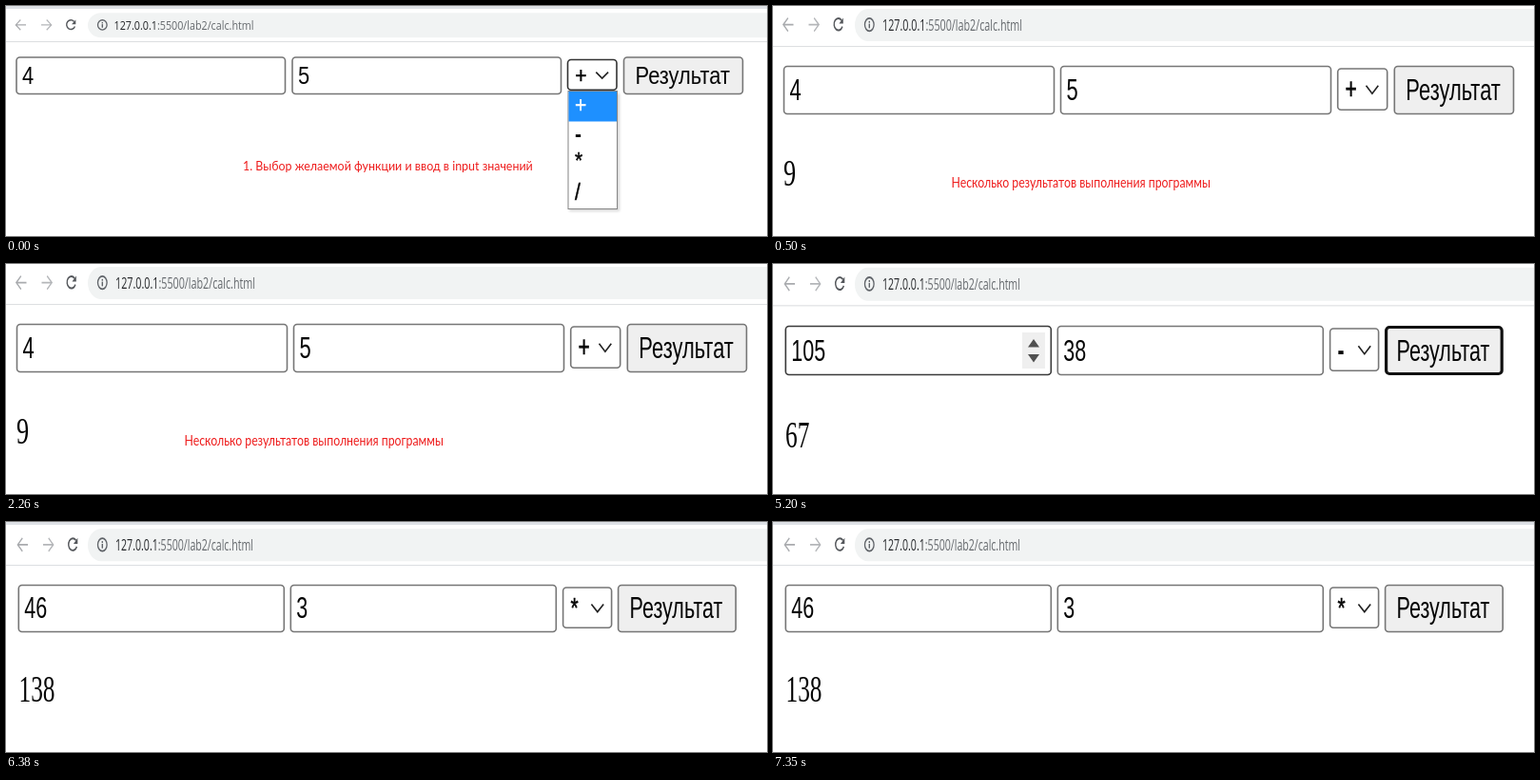
Animation of 800 by 242 pixels, one loop 8 s. Source, as an HTML page:

```html
<!DOCTYPE html>
<html lang="ru">
<head>
<meta charset="utf-8">
<title>Calculator demo</title>
<style>
html, body { margin: 0; width: 100%; height: 100%; overflow: hidden; background: #fff; }
svg { display: block; width: 100vw; height: 100vh; }
text { white-space: pre; }
.ui { font-family: "Liberation Sans", Arial, sans-serif; }
.url { font-family: "Open Sans", "Noto Sans", sans-serif; }
.out { font-family: "Liberation Serif", "Times New Roman", serif; }
.note { font-family: Lato, "Open Sans", sans-serif; }
</style>
</head>
<body>
<svg id="stage" viewBox="0 0 800 242" preserveAspectRatio="none"></svg>
<script>
const LOOP = 8000;
const GREY = '#767676', INK = '#060606';

const rect = (x, y, x2, y2, fill, extra = '') =>
  `<rect x="${x}" y="${y}" width="${x2 - x}" height="${y2 - y}" fill="${fill}" ${extra}/>`;

const box = (x, y, x2, y2, fill = '#fff', stroke = GREY, w = 1.6) =>
  rect(x, y, x2, y2, fill, `rx="3.5" stroke="${stroke}" stroke-width="${w}"`);

const line = (d, color, w) =>
  `<path d="${d}" fill="none" stroke="${color}" stroke-width="${w}"/>`;

// Each screenshot is taller than its natural shape, so glyphs share a vertical scale.
const label = (cls, x, y, str, size, tall, fill = INK, extra = '') =>
  `<text class="${cls}" transform="translate(${x} ${y}) scale(1 ${tall})" font-size="${size}" fill="${fill}" ${extra}>${str}</text>`;

const sign = (x, y, op, tall, fill = INK) =>
  label('ui', x, y, op, 21, tall, fill,
    op === '-' ? 'font-weight="700"' : `stroke="${fill}" stroke-width="0.4"`);

function arrow(x, dir, color) {
  return line(`M${x - 5.5 * dir} 0H${x + 5 * dir}M${x + 0.2 * dir} -5L${x + 5.2 * dir} 0L${x + 0.2 * dir} 5`, color, 1.2);
}

function toolbar(s) {
  const { mid, half, tall, shift } = s.bar;
  const icons = `<g transform="translate(0 ${mid - 0.4}) scale(1 ${tall})">` +
    arrow(15.5 + shift, -1, '#a9abae') + arrow(42.5 + shift, 1, '#b4b6b9') +
    line(`M${71.6 + shift} -3.2A4.5 4.5 0 1 0 ${72.4 + shift} 1.4`, '#54575b', 1.4) +
    `<path d="M${73.3 + shift} -5.1V-0.7H${69 + shift}Z" fill="#54575b"/>` +
    '<circle cx="101.3" cy="0" r="4.8" fill="none" stroke="#5f6368" stroke-width="1.3"/>' +
    rect(100.6, -0.7, 102, 2.7, '#5f6368') + rect(100.6, -2.7, 102, -1.4, '#5f6368') +
    '</g>';
  return (s.strip ? rect(0, 0, 800, s.strip, '#dee1e6') : '') +
    `<path d="M800 ${mid - half}H100A14 ${half} 0 0 0 100 ${mid + half}H800Z" fill="#f1f3f3"/>` +
    rect(0, s.rule - 0.5, 800, s.rule + 0.6, '#dddfe2') + icons +
    label('url', s.urlX, s.urlY, '127.0.0.1<tspan fill="#666a6e">:5500/lab2/calc.html</tspan>', s.urlSize, s.urlTall, '#26282b');
}

function form(s) {
  const [a, b, sel, btn] = s.x;
  const { top, bottom, base, tall, size } = s;
  const cy = (top + bottom) / 2;
  const inset = s.focus ? 1 : 0;
  return box(a[0], top, a[1], bottom, '#fff', s.hover) +
    box(b[0], top, b[1], bottom) +
    box(sel[0], top + 2.5, sel[1], bottom - 4.2, '#fff', s.menu ? '#333' : GREY) +
    box(btn[0] + inset, top + inset, btn[1] - inset, bottom - inset, '#efefef',
      s.focus ? '#101010' : GREY, s.focus ? 3.2 : 1.6) +
    label('ui', a[0] + 6, base, s.left, size, tall) +
    label('ui', b[0] + 6, base, s.right, size, tall) +
    sign(sel[0] + 7.8, base - 1, s.op, tall) +
    line(`M${sel[0] + 29.8} ${cy - 3.2 * tall}l6.4 ${5.7 * tall}l6.4 ${-5.7 * tall}`, '#222', 1.6) +
    label('ui', btn[0] + 12, base, 'Результат', size, tall);
}

function menu() {
  const rows = [['+', 112], ['-', 143], ['*', 171], ['/', 204]];
  return rect(592, 92, 645, 216, '#000', 'opacity=".16" filter="url(#blur)"') +
    rect(591, 89.5, 642.5, 213.5, '#fff', 'stroke="#858585" stroke-width="1"') +
    rect(591.5, 90, 642, 121.5, '#1e90ff') +
    rows.map(([op, y], i) => sign(598, y, op, 1.13, i ? INK : '#fff')).join('');
}

function spinner() {
  return rect(262, 72, 286, 110, '#efefef') +
    '<path d="M268 87.5L274 79L280 87.5ZM268 95L274 103.5L280 95Z" fill="#505050"/>';
}

const wide = [[11.5, 295.5], [302.5, 586.5], [593.7, 645.7], [653.3, 778.5]];
const slim = [[13.3, 292.3], [299.3, 578.3], [585.6, 636.6], [643.6, 767.2]];

const scenes = [
  { at: 0, strip: 3, rule: 37.5, bar: { mid: 20.3, half: 13, tall: 1.08, shift: 0 },
    urlX: 113.5, urlY: 24.7, urlSize: 10.75, urlTall: 1.2,
    x: [[11, 293.5], [301, 583.5], [590.5, 642], [649.5, 774.5]],
    top: 54, bottom: 92.5, base: 82, tall: 1.15, size: 21.9, left: '4', right: '5', op: '+', menu: true,
    note: [249, 173, '1. Выбор желаемой функции и ввод в input значений', 12.45, 1.03] },
  { at: 500, rule: 42.5, bar: { mid: 20, half: 17, tall: 1.4, shift: 0.5 },
    urlX: 115, urlY: 25.9, urlSize: 10.75, urlTall: 1.6,
    x: wide, top: 63.5, bottom: 113.5, base: 99, tall: 1.46, size: 21.9, left: '4', right: '5', op: '+',
    out: ['9', 11, 189, 26.2], note: [187.5, 191, 'Несколько результатов выполнения программы', 12.3, 1.32] },
  { at: 3440, rule: 43.8, bar: { mid: 21.3, half: 17.5, tall: 1.45, shift: 2 },
    urlX: 115, urlY: 27.3, urlSize: 10.6, urlTall: 1.62,
    x: slim, top: 65.5, bottom: 116.5, base: 101.6, tall: 1.48, size: 21.5, left: '105', right: '38', op: '-',
    hover: '#3a3a3a', focus: true, spin: true, out: ['67', 13, 193.3, 25.3] },
  { at: 6380, strip: 3, rule: 45.5, bar: { mid: 24.3, half: 17, tall: 1.4, shift: 2 },
    urlX: 115, urlY: 30.3, urlSize: 10.6, urlTall: 1.6,
    x: slim, top: 66.5, bottom: 115.5, base: 101.3, tall: 1.44, size: 21.5, left: '46', right: '3', op: '*',
    out: ['138', 13.5, 189, 25.3] }
];

function draw(s) {
  let art = rect(0, 0, 800, 242, '#fff') + toolbar(s) + form(s);
  if (s.menu) art += menu();
  if (s.spin) art += spinner();
  if (s.out) {
    const [str, x, y, size] = s.out;
    art += label('out', x, y, str, size, 1.56);
  }
  if (s.note) {
    const [x, y, str, size, tall] = s.note;
    art += label('note', x, y, str, size, tall, '#ee1c1c');
  }
  return art;
}

const stage = document.getElementById('stage');
stage.innerHTML = '<defs><filter id="blur"><feGaussianBlur stdDeviation="1.8"/></filter></defs>' +
  scenes.map(s => `<g>${draw(s)}</g>`).join('');
const groups = stage.querySelectorAll(':scope > g');

function render(t) {
  const now = scenes.findLastIndex(s => t >= s.at);
  groups.forEach((g, i) => { g.style.display = i === now ? '' : 'none'; });
}

const start = performance.now();
function tick() {
  render((performance.now() - start) % LOOP);
  requestAnimationFrame(tick);
}
tick();
</script>
</body>
</html>
```
